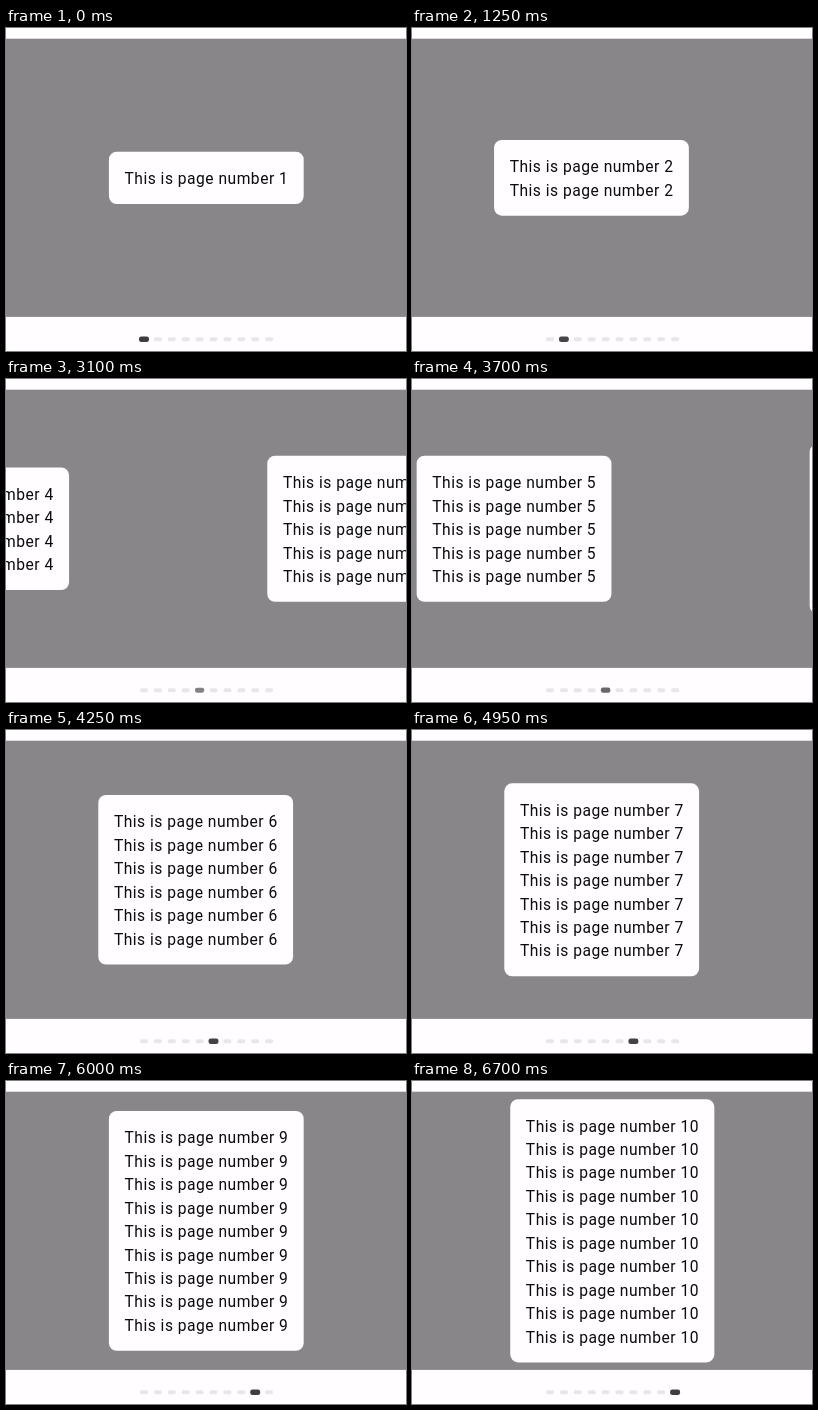
Recreate the animation shown at these times as an HTML page. Size 400x323 px, loop 6950 ms.

```html
<!DOCTYPE html>
<html lang="en">
<head>
<meta charset="utf-8">
<title>Pager</title>
<style>
  html, body { margin: 0; width: 100%; height: 100%; overflow: hidden; background: #fffdff; }
  svg { display: block; width: 400px; height: 323px; }
  text { font: 15.63px Roboto, sans-serif; letter-spacing: .488px; fill: #0b0a0c; }
</style>
</head>
<body>
<svg id="stage" viewBox="0 0 400 323">
  <rect y="10.7" width="400" height="278.2" fill="#888688"/>
</svg>
<script>
const LOOP = 6950, STEP = 50, PAGES = 10, PITCH = 393;
const LINE = 23.44, MIDDLE_Y = 149.8;
const LIGHT = [232, 230, 233], DARK = [62, 60, 63];

// Swipe progress at each 50 ms step
const quick = [.04, .13, .27, .43, .597, .88, 1];
const normal = [.027, .11, .25, .445, .658, .87, .975, 1];
const medium = [.03, .1, .21, .35, .52, .71, .88, .975, 1];
const slow = [.053, .1, .17, .26, .38, .53, .69, .84, .94, .985, 1];
const swipes = [
  [450, medium], [1250, slow], [2150, normal], [2900, quick], [3600, normal],
  [4250, normal], [4950, normal], [5650, normal], [6350, normal]
];

const stage = document.getElementById('stage');

function add(parent, tag, attrs) {
  const el = document.createElementNS('http://www.w3.org/2000/svg', tag);
  setAll(el, attrs);
  return parent.appendChild(el);
}

function setAll(el, attrs) {
  for (const key in attrs) el.setAttribute(key, attrs[key]);
}

function makeCard(_, i) {
  const n = i + 1;
  const g = add(stage, 'g', {});
  const w = n < 10 ? 194.8 : 204.1;
  const h = 28.8 + LINE * n;
  const x = 200.3 - w / 2, y = MIDDLE_Y - h / 2;
  add(g, 'rect', { x, y, width: w, height: h, rx: 7.8, fill: '#fffdff' });
  for (let k = 0; k < n; k++) {
    add(g, 'text', { x: x + 15.6, y: y + 32.4 + k * LINE })
      .textContent = 'This is page number ' + n;
  }
  return g;
}

const cards = Array.from({ length: PAGES }, makeCard);
const dots = cards.map(() => add(stage, 'rect', {}));

function positionAt(time) {
  let page = 0;
  for (const [start, curve] of swipes) {
    if (time < start) break;
    const k = Math.floor((time - start) / STEP);
    page += curve[Math.min(k, curve.length - 1)];
  }
  return page;
}

function draw(time) {
  const pos = positionAt(time);
  const current = Math.round(pos);
  cards.forEach((card, i) => {
    const dx = (i - pos) * PITCH;
    card.style.display = Math.abs(dx) < 310 ? '' : 'none';
    card.setAttribute('transform', `translate(${dx.toFixed(2)} 0)`);
  });
  dots.forEach((dot, i) => {
    const on = i === current ? 1 - Math.abs(i - pos) : 0;
    const w = 8 + 2 * on, h = 4 + 1.6 * on;
    const rgb = LIGHT.map((c, j) => Math.round(c + (DARK[j] - c) * on));
    setAll(dot, {
      x: 138 + i * 13.9 - w / 2, y: 311.2 - h / 2,
      width: w, height: h, rx: h / 2.4, fill: `rgb(${rgb})`
    });
  });
}

const begin = performance.now();
function tick() {
  draw((performance.now() - begin) % LOOP);
  requestAnimationFrame(tick);
}
tick();
</script>
</body>
</html>
```
